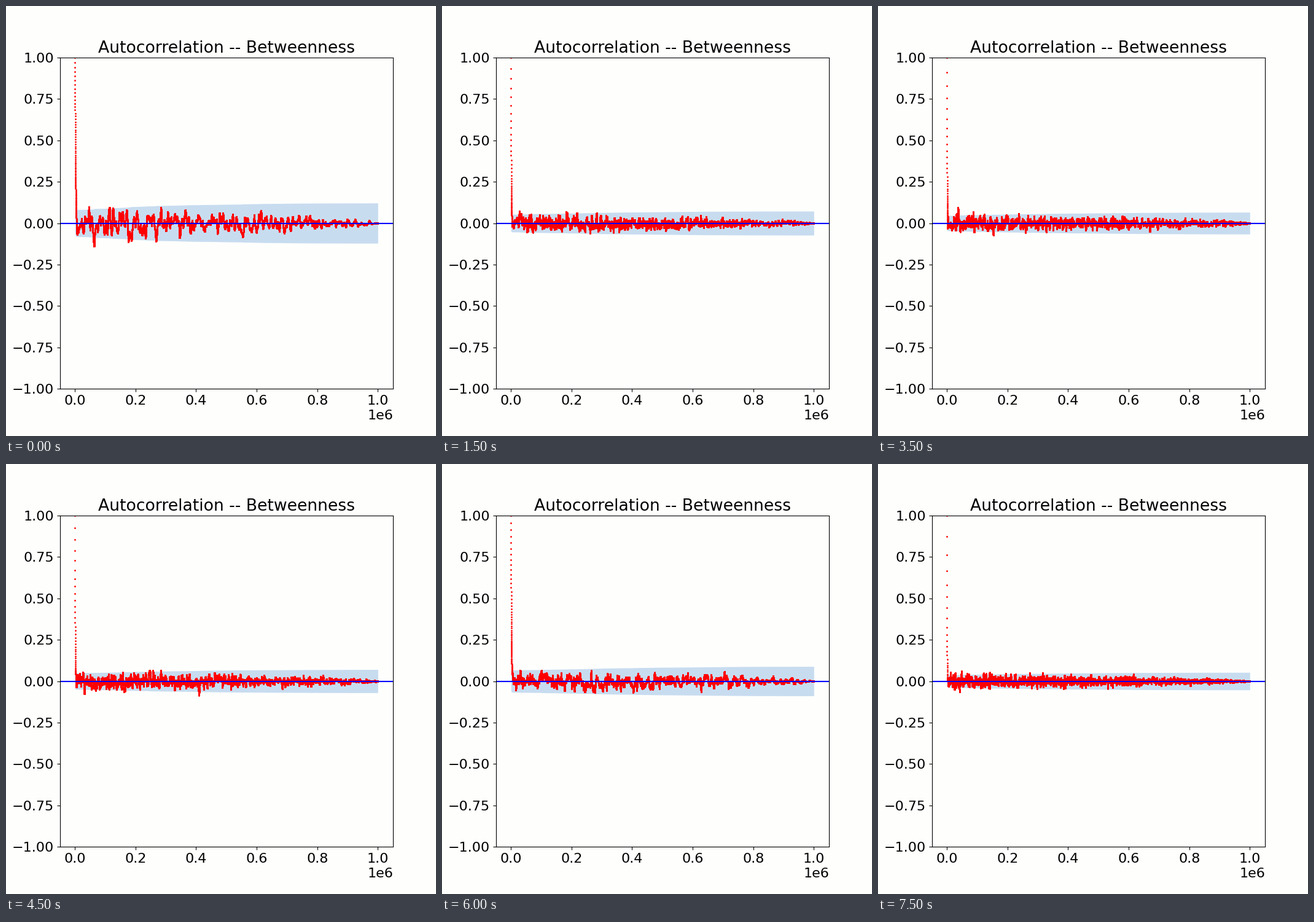
Recreate the animation shown at these times as a matplotlib script. Size 700x700 px, loop 8000 ms.

```python
import numpy as np
import matplotlib.pyplot as plt
from matplotlib.animation import FuncAnimation

FRAMES = 16
SAMPLES = 20000
STEP = 50          # iterations between samples
X = np.arange(SAMPLES) * STEP


def persistence(k):
    """Lag-one correlation: two settings cycle like digits, both speed up mixing."""
    row, col = divmod(k, 4)
    mixing = .03 * np.exp(.517 * col ** .4) * (1 + row) ** (.26 + .065 * col)
    return 1 - mixing


def simulate(phi, seed):
    """First-order autoregressive chain."""
    noise = np.random.default_rng(seed).normal(size=SAMPLES)
    chain = np.empty(SAMPLES)
    value = noise[0] / np.sqrt(1 - phi ** 2)
    for i, kick in enumerate(noise):
        value = phi * value + kick
        chain[i] = value
    return chain - chain.mean()


def autocorrelation(chain):
    spectrum = np.fft.rfft(chain, 2 * SAMPLES)
    acf = np.fft.irfft(np.abs(spectrum) ** 2)[:SAMPLES]
    return acf / acf[0]


def bartlett_band(acf):
    """95 % confidence limit for every lag from one on."""
    variance = np.full(SAMPLES - 1, 1 / SAMPLES)
    variance[1:] *= 1 + 2 * np.cumsum(acf[1:-1] ** 2)
    return 1.96 * np.sqrt(variance)


curves = [autocorrelation(simulate(persistence(k), 100 + k))
          for k in range(FRAMES)]
limits = [bartlett_band(acf) for acf in curves]

plt.rcParams.update({"font.family": "DejaVu Sans", "font.size": 16})
BACKGROUND = "#fefffd"
fig, ax = plt.subplots(figsize=(7, 7), dpi=100, facecolor=BACKGROUND)
fig.subplots_adjust(left=.125, right=.9, bottom=.11, top=.88)
ax.set_facecolor(BACKGROUND)
ax.set_title("Autocorrelation -- Betweenness")
ax.set_xlim(-.05e6, 1.05e6)
ax.set_ylim(-1, 1)
ax.set_xticks(np.arange(6) * .2e6)
ax.set_yticks(np.linspace(-1, 1, 9))

band = ax.fill_between(X[1:], -limits[0], limits[0],
                       color="#c8dcf0", linewidth=0)
dots, = ax.plot(X, curves[0], "o", color="red", markersize=1)
ax.axhline(0, color="blue")


def update(k):
    dots.set_ydata(curves[k])
    upper = np.column_stack([X[1:], limits[k]])
    lower = np.column_stack([X[1:], -limits[k]])[::-1]
    band.set_verts([np.vstack([upper, lower])])
    return dots, band


anim = FuncAnimation(fig, update, frames=FRAMES, interval=500,
                     repeat=True, repeat_delay=0)
plt.show()
```
